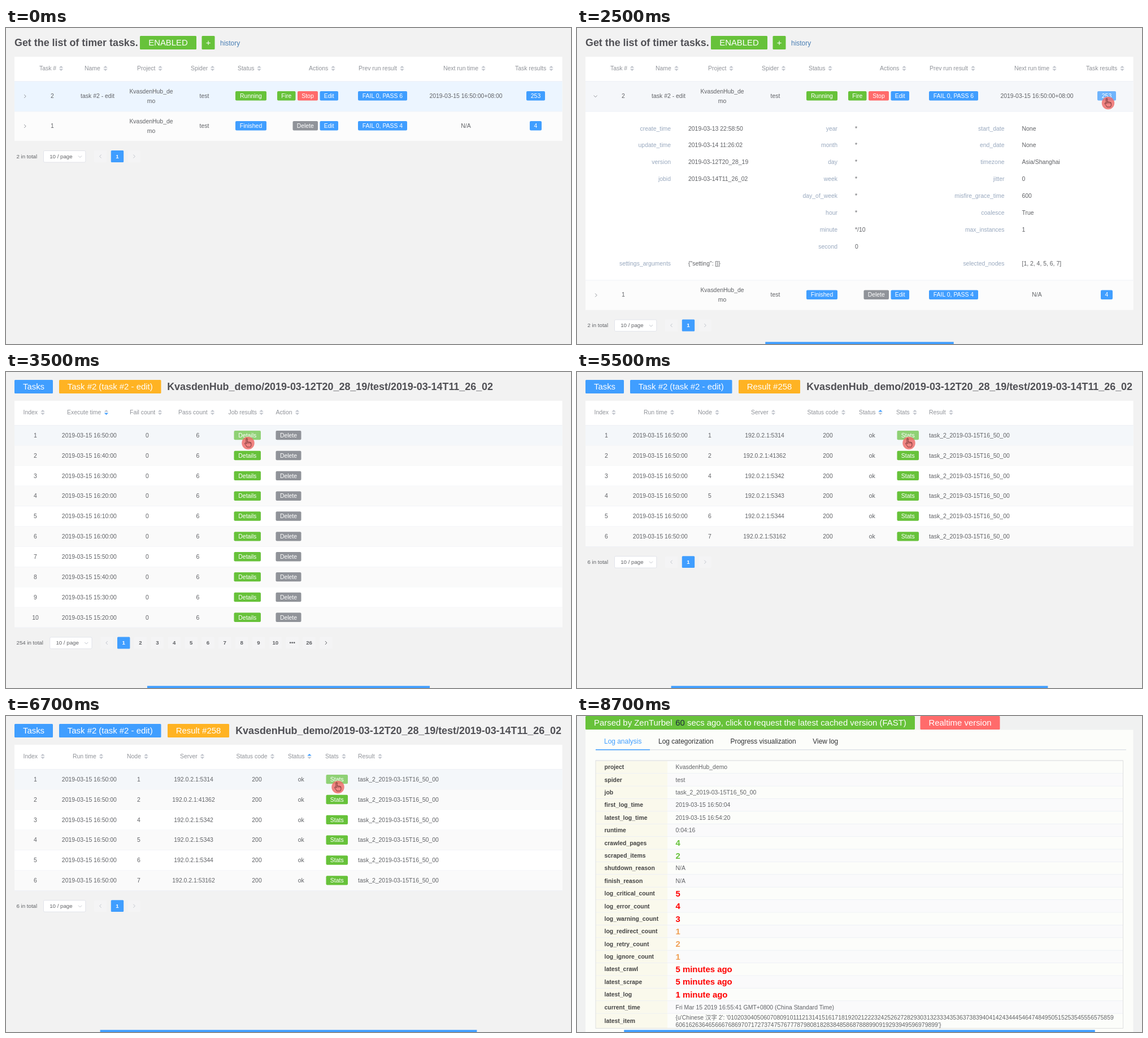
These frames come from a looping animation (1000x560 px, 9.5 s). An HTML page:

```html
<!DOCTYPE html>
<html lang="en">
<head>
<meta charset="utf-8">
<title>Timer tasks</title>
<style>
  html, body { margin: 0; width: 100%; height: 100%; overflow: hidden; background: #f2f2f2; }
  svg { display: block; font-family: "Liberation Sans", Arial, "Noto Sans CJK SC", "Noto Sans CJK", sans-serif; }
</style>
</head>
<body>
<svg id="stage" width="1000" height="560" viewBox="0 0 1000 560"></svg>
<script>
const BLUE = '#409eff', GREEN = '#67c23a', RED = '#ff6b6b', GREY = '#909399', ORANGE = '#ffb323';
const INK = '#606266', PALE = '#c0c4cc', LINE = '#ebeef5', STRIPE = '#fafafa';
const SIZE = 10.45, BIG = 14.92;
const PROJECT = 'KvasdenHub_demo';
const JOB_PATH = PROJECT + '/2019-03-12T20_28_19/test/2019-03-14T11_26_02';

// Drawing helpers; y is the vertical centre of a text line
const rect = (x1, y1, x2, y2, fill, more = '') =>
  `<rect x="${x1}" y="${y1}" width="${x2 - x1}" height="${y2 - y1}" fill="${fill}" ${more}/>`;
const text = (x, y, label, { size = SIZE, fill = INK, anchor = 'start', bold = false } = {}) =>
  `<text x="${x}" y="${y + size * 0.36}" font-size="${size}" fill="${fill}" text-anchor="${anchor}"` +
  `${bold ? ' font-weight="700"' : ''}>${label}</text>`;
const mid = (x, y, label, style) => text(x, y, label, { anchor: 'middle', ...style });
const path = (d, stroke, width = 1) =>
  `<path d="${d}" fill="none" stroke="${stroke}" stroke-width="${width}"/>`;
const rule = y => rect(15, y - 0.4, 984.5, y + 0.4, LINE);
const chevron = (x, y, angle, stroke) =>
  `<g transform="translate(${x} ${y}) rotate(${angle})">${path('M-1.5-3L1.5 0L-1.5 3', stroke)}</g>`;

const tag = (x1, x2, y, label, fill) =>
  rect(x1, y - 8.2, x2, y + 8.2, fill, 'rx="2"') + mid((x1 + x2) / 2, y, label, { fill: '#fff' });
const button = (x1, x2, label, fill, y = 26) =>
  rect(x1, y - 12, x2, y + 12, fill, 'rx="1.5"') + mid((x1 + x2) / 2, y, label, { size: BIG, fill: '#fff' });
const title = (x, label, anchor) =>
  text(x, 25.3, label, { size: 17.9, fill: '#505055', bold: true, anchor });

function header(columns, sorted, direction) {
  return columns.map(([label, x, icon]) => {
    const color = d => label === sorted && d === direction ? BLUE : PALE;
    return text(x, 71, label, { fill: GREY }) +
      `<path d="M${icon - 3.7} 70.6h7.4l-3.7-3.7z" fill="${color('up')}"/>` +
      `<path d="M${icon - 3.7} 72.4h7.4l-3.7 3.7z" fill="${color('down')}"/>`;
  }).join('') + rule(94.5);
}

function pager(y, total, shift = 0, pages = [1]) {
  const box = (x, fill) => rect(x - 11.2, y - 10.4, x + 11.2, y + 10.4, fill, 'rx="1.5"');
  const first = 197 + shift, step = 29.85, next = first + step * pages.length;
  const select = 66.5 + shift;
  return text(18.5, y, total + ' in total', { size: 9.7 }) +
    rect(select, y - 10, select + 74.3, y + 10.4, '#fff', 'rx="2" stroke="#dcdfe6" stroke-width=".8"') +
    text(select + 10.7, y, '10 / page', { size: 9.7 }) +
    chevron(select + 64.5, y + 0.5, 90, PALE) +
    box(first - step, '#f4f4f5') + chevron(first - step, y, 180, PALE) +
    pages.map((page, i) => {
      const x = first + step * i;
      return box(x, i ? '#f4f4f5' : BLUE) +
        mid(x, y, page, { size: 9.7, bold: true, fill: i ? INK : '#fff' });
    }).join('') +
    box(next, '#f4f4f5') + chevron(next, y, 0, pages.length > 1 ? INK : PALE);
}

const pointer = (x, y) =>
  `<g transform="translate(${x} ${y})"><circle r="11.2" fill="#ee6f6c" opacity=".85"/>` +
  path('M-3.5 1V-7q0-1.3 1.1-1.3t1.1 1.3V-2q1.5-1 2.4.3q1.6-.8 2.4.5q1.8-.3 1.9 1.2V4' +
    'q-.2 1.5-1.3 3h-6q-1-2-3.8-5.6q-.6-1.5.6-1.6q1 .2 2.2 1.5z' +
    'M-1.3-2v3M1.1-1.7v2.5M3.5-1.2v2.2', '#6b2f2f', 0.9) + '</g>';

const progress = step => rect(500 - step * 83.35, 556.3, 500 + step * 83.35, 560, BLUE);

const TASK_COLUMNS = [['Task #', 59, 97.5], ['Name', 139, 176], ['Project', 232, 273], ['Spider', 327, 365.5],
  ['Status', 410, 448], ['Actions', 536, 579], ['Prev run result', 624, 701],
  ['Next run time', 774, 845], ['Task results', 901, 965]];

const DETAILS = [
  [166, 197, { create_time: '2019-03-13 22:58:50', update_time: '2019-03-14 11:26:02',
    version: '2019-03-12T20_28_19', jobid: '2019-03-14T11_26_02' }],
  [461, 492, { year: '*', month: '*', day: '*', week: '*', day_of_week: '*', hour: '*', minute: '*/10', second: '0' }],
  [756.5, 787.5, { start_date: 'None', end_date: 'None', timezone: 'Asia/Shanghai', jitter: '0',
    misfire_grace_time: '600', coalesce: 'True', max_instances: '1' }]
];

function taskDetails() {
  const field = (right, left, y, label, value) =>
    text(right, y, label, { fill: '#99a9bf', anchor: 'end' }) + text(left, y, value);
  return rule(148) +
    DETAILS.map(([right, left, fields]) => Object.entries(fields)
      .map(([label, value], i) => field(right, left, 177.8 + i * 29.87, label, value)).join('')).join('') +
    field(166, 197, 416.8, 'settings_arguments', '{"setting": []}') +
    field(756.5, 787.5, 416.8, 'selected_nodes', '[1, 2, 4, 5, 6, 7]') + rule(447);
}

function taskList(open, rowFill, countFill = BLUE) {
  const dy = open ? 299.5 : 0, y1 = 120.2, y2 = 173.2 + dy;
  const project = y => mid(257, y - 8.4, PROJECT.slice(0, 13)) + mid(257, y + 8.6, PROJECT.slice(13));
  return title(15, 'Get the list of timer tasks.') +
    button(237, 337, 'ENABLED', GREEN) + button(346.5, 369.5, '+', GREEN) +
    text(379, 27, 'history', { size: 11.94, fill: '#4a7fb5' }) +
    rect(15, 51, 984.5, 200 + dy, '#fff') + rect(15, 94.5, 984.5, 148, rowFill) +
    rect(15, 147.8 + dy, 984.5, 200 + dy, '#fcfcfc') + header(TASK_COLUMNS) +
    (open ? taskDetails() : rule(148)) +
    chevron(open ? 32.7 : 33.7, 121, open ? 90 : 0, GREY) +
    mid(82, y1, 2) + mid(162, y1, 'task #2 - edit') + project(y1) + mid(351, y1, 'test') +
    tag(406, 461, y1, 'Running', GREEN) + tag(480, 512.5, y1, 'Fire', GREEN) +
    tag(516, 552, y1, 'Stop', RED) + tag(555.5, 588, y1, 'Edit', BLUE) +
    tag(623, 710, y1, 'FAIL 0, PASS 6', BLUE) + mid(814, y1, '2019-03-15 16:50:00+08:00') +
    tag(921, 954, y1, 253, countFill) +
    chevron(33.7, y2 + 0.8, 0, GREY) + mid(82, y2, 1) + project(y2) + mid(351, y2, 'test') +
    tag(406, 461, y2, 'Finished', BLUE) + tag(507.5, 552, y2, 'Delete', GREY) +
    tag(555.5, 588, y2, 'Edit', BLUE) + tag(623, 710, y2, 'FAIL 0, PASS 4', BLUE) +
    mid(814, y2, 'N/A') + tag(927, 948, y2, 4, BLUE) +
    pager(227.5 + dy, 2);
}

function rows(count, draw) {
  const height = 35.85;
  let out = rect(15, 51, 984.5, 94.5 + count * height, '#fff');
  for (let i = 0; i < count; i++) {
    const top = 94.5 + i * height;
    out += rect(15, top, 984.5, top + height, i === 0 ? '#f4f7fa' : i % 2 ? STRIPE : '#fff') +
      rule(top + height) + draw(i, top + height / 2 - 0.3);
  }
  return out;
}

function runList() {
  const time = i => {
    const minutes = 16 * 60 + 50 - i * 10;
    return `2019-03-15 ${Math.floor(minutes / 60)}:${String(minutes % 60).padStart(2, '0')}:00`;
  };
  return button(15, 83, 'Tasks', BLUE) + button(94, 274.5, 'Task #2 (task #2 - edit)', ORANGE) +
    title(862, JOB_PATH, 'end') +
    rows(10, (i, y) => mid(52, y, i + 1) + mid(147.3, y, time(i)) + mid(250, y, 0) + mid(339.5, y, 6) +
      tag(403.5, 451, y, 'Details', i ? GREEN : '#8fd175') + tag(477.5, 522.5, y, 'Delete', GREY)) +
    header([['Index', 30.5, 65], ['Execute time', 108, 177.5], ['Fail count', 219, 272.5],
      ['Pass count', 305, 365.5], ['Job results', 393.5, 452], ['Action', 477.5, 515.5]], 'Execute time', 'down') +
    pager(480, 254, 11.2, [1, 2, 3, 4, 5, 6, 7, 8, 9, 10, '•••', 26]);
}

function nodeList() {
  const nodes = [1, 2, 4, 5, 6, 7], ports = [5314, 41362, 5342, 5343, 5344, 53162];
  return button(15, 83, 'Tasks', BLUE) + button(94, 274.5, 'Task #2 (task #2 - edit)', BLUE) +
    button(286, 395, 'Result #258', ORANGE) + title(983, JOB_PATH, 'end') +
    rows(6, (i, y) => mid(52, y, i + 1) + mid(147.3, y, '2019-03-15 16:50:00') + mid(235, y, nodes[i]) +
      mid(332, y, '192.0.2.1:' + ports[i]) + mid(444, y, 200) + mid(522.3, y, 'ok') +
      tag(566.5, 605, y, 'Stats', i ? GREEN : '#8fd175') + text(623, y, 'task_2_2019-03-15T16_50_00')) +
    header([['Index', 30.5, 65], ['Run time', 118, 168.5], ['Node', 214, 248], ['Server', 308, 347.5],
      ['Status code', 407.5, 471.5], ['Status', 499, 537], ['Stats', 565, 598], ['Result', 623, 662]], 'Status', 'up') +
    pager(336.7, 6);
}

function logReport() {
  const digits = (from, to) => {
    let out = '';
    for (let n = from; n <= to; n++) out += String(n).padStart(2, '0');
    return out;
  };
  const bad = '#ff0000', warn = '#f0a055';
  const entries = [['project', PROJECT], ['spider', 'test'], ['job', 'task_2_2019-03-15T16_50_00'],
    ['first_log_time', '2019-03-15 16:50:04'], ['latest_log_time', '2019-03-15 16:54:20'], ['runtime', '0:04:16'],
    ['crawled_pages', 4, GREEN], ['scraped_items', 2, GREEN], ['shutdown_reason', 'N/A'], ['finish_reason', 'N/A'],
    ['log_critical_count', 5, bad], ['log_error_count', 4, bad], ['log_warning_count', 3, bad],
    ['log_redirect_count', 1, warn], ['log_retry_count', 2, warn], ['log_ignore_count', 1, warn],
    ['latest_crawl', '5 minutes ago', bad], ['latest_scrape', '5 minutes ago', bad],
    ['latest_log', '1 minute ago', bad], ['current_time', 'Fri Mar 15 2019 16:55:41 GMT+0800 (China Standard Time)'],
    ['latest_item', '']];
  const white = { size: BIG, fill: '#fff' }, tab = { size: 11.94, fill: '#303133' };
  const top = 79.3, height = 22.39, last = entries.length - 1, bottom = 553.5;
  return rect(0, 0, 1000, 560, '#f0f1f1') + rect(15, 24.5, 984.5, 560, '#fcfdfa') +
    button(15, 598, '', GREEN, 12) + text(30, 12, 'Parsed by ZenTurbel', white) +
    text(174.3, 12, '60', { size: BIG, fill: '#1f2d3d' }) +
    text(195, 12, 'secs ago, click to request the latest cached version (FAST)', white) +
    button(607.5, 748.5, 'Realtime version', RED, 12) +
    text(48, 44.5, 'Log analysis', { ...tab, fill: BLUE }) + text(144, 44.5, 'Log categorization', tab) +
    text(271.5, 44.5, 'Progress visualization', tab) + text(417.3, 44.5, 'View log', tab) +
    rect(33, 59, 972, 60.5, '#dfe3e8') + rect(33, 59, 129, 60.5, BLUE) +
    entries.map(([label, value, color], i) => {
      const y1 = top + i * height, y2 = i === last ? bottom : y1 + height, y = (y1 + y2) / 2;
      return rect(33, y1, 966.5, y2, i % 2 ? '#fafafb' : '#fcfdfa') + rect(33, y1, 160, y2, '#faf9ec') +
        rect(33, y1 - 0.4, 966.5, y1 + 0.4, LINE) +
        text(48.5, y, label, { bold: true, fill: '#444' }) +
        text(174.5, y, value, color ? { size: BIG, bold: true, fill: color } : {});
    }).join('') +
    text(174.5, 534.5, `{u'Chinese 汉字 2': '${digits(1, 59)}`) + text(174.5, 547, digits(60, 99) + "'}") +
    rect(33, top - 0.4, 966.5, bottom, 'none', 'stroke="#dcdddd" stroke-width=".9"');
}

const scenes = [
  [0, taskList(false, '#ecf5ff')],
  [1500, taskList(true, '#f3f7fa') + pointer(44, 130)],
  [2500, taskList(true, '#f5f7fa', '#6fb4fc') + pointer(940, 133)],
  [3500, runList() + pointer(428.5, 126)],
  [5500, nodeList() + pointer(587.5, 126)],
  [7500, logReport()]
].map(([start, markup], i) => ({ start, markup: markup + progress(i) }));

const stage = document.getElementById('stage');
let shown;
function draw() {
  const time = performance.now() % 9500;
  const scene = scenes.findLast(s => s.start <= time);
  if (scene !== shown) {
    stage.innerHTML = scene.markup;
    shown = scene;
  }
  requestAnimationFrame(draw);
}
draw();
</script>
</body>
</html>
```
